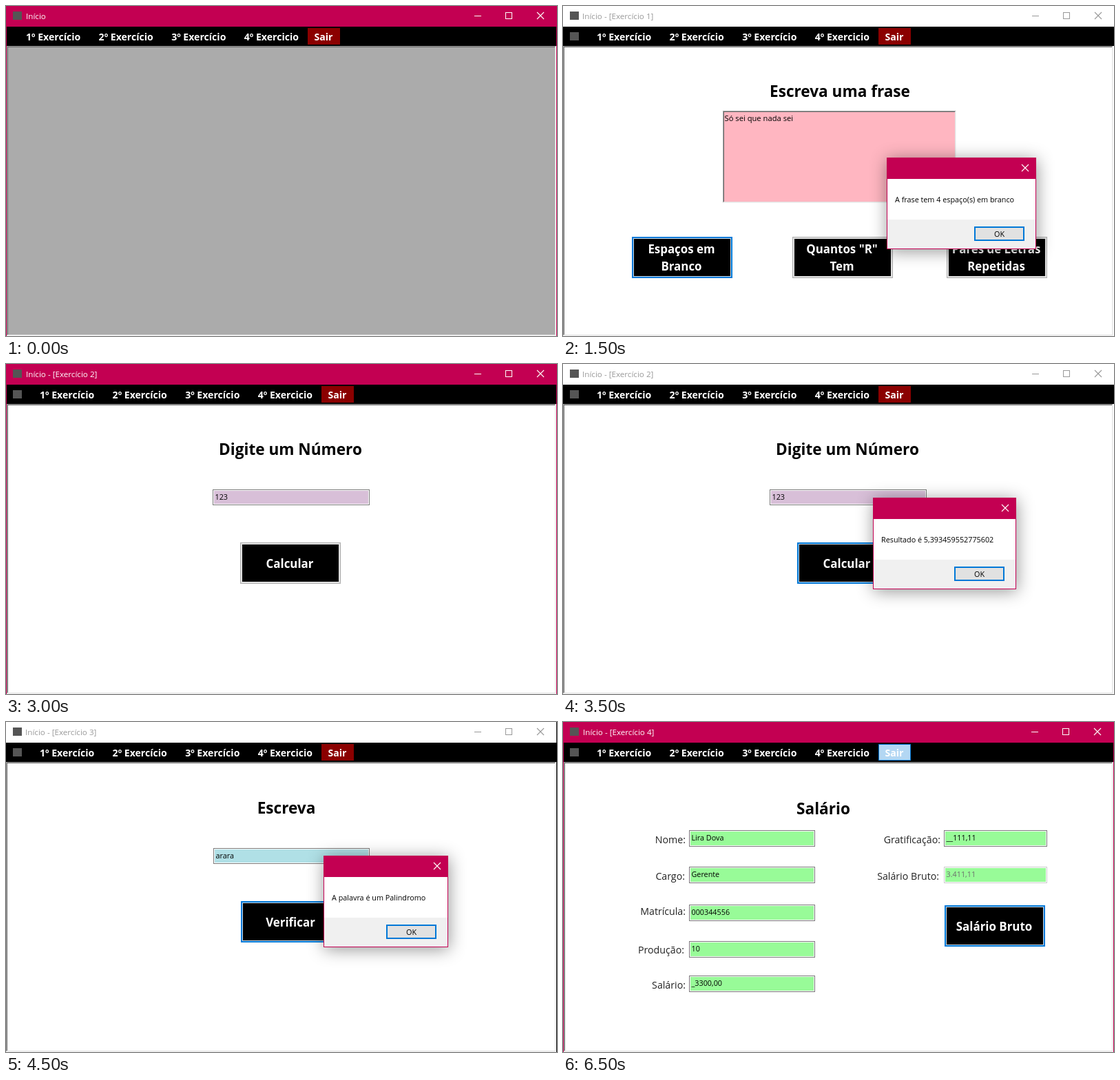
Recreate the animation shown at these times as an HTML page. Size 800x479 px, loop 7 s.

```html
<!DOCTYPE html>
<html lang="pt">
<head>
<meta charset="utf-8">
<style>
  html, body { margin: 0; width: 100%; height: 100%; overflow: hidden; background: #fff; }
  svg { display: block; width: 100vw; height: 100vh; font-family: "Open Sans", "Noto Sans", sans-serif; }
  text { white-space: pre; }
  rect { shape-rendering: crispEdges; }
  .dialog { filter: drop-shadow(1px 3px 12px rgba(0, 0, 0, .42)); }
</style>
</head>
<body>
<svg id="stage" viewBox="0 0 800 479"></svg>
<script>
const PINK = '#c30052', BLUE = '#0078d7', STEP_MS = 500;
const PHRASE = 'Só sei que nada sei', WORD = 'subinoonibus';

const steps = [
  { ex: 0 },
  { ex: 1, text: '', hover: 0 },
  { ex: 1, text: PHRASE },
  { ex: 1, text: PHRASE, focus: 0, dialog: [470, 220, 217, 'A frase tem 4 espaço(s) em branco'] },
  { ex: 1, text: WORD },
  { ex: 1, text: WORD, focus: 2, dialog: [485, 220, 188, 'A frase tem 1 pares de letras'] },
  { ex: 2, text: '123' },
  { ex: 2, text: '123', focus: 0, dialog: [450, 194, 208, 'Resultado é 5,393459552775602'] },
  { ex: 3, text: 'arara' },
  { ex: 3, text: 'arara', focus: 0, dialog: [461, 194, 181, 'A palavra é um Palindromo'] },
  { ex: 4 },
  { ex: 4, filled: true },
  { ex: 4, filled: true, gross: '3.411,11', focus: 0 },
  { ex: 4, filled: true, gross: '3.411,11', focus: 0, hover: 4 }
];

const rect = (x, y, w, h, fill) =>
  `<rect x="${x}" y="${y}" width="${w}" height="${h}" fill="${fill}"/>`;

const text = (x, y, size, str, { fill = '#000', bold = false, anchor = 'start' } = {}) =>
  `<text x="${x}" y="${y}" font-size="${size}" fill="${fill}" font-weight="${bold ? 700 : 400}" text-anchor="${anchor}">${str}</text>`;

const heading = (x, y, str) => text(x, y, 22.6, str, { bold: true, anchor: 'middle' });

// Nested rectangles, one pixel of border per colour.
const framed = (x, y, w, h, ...colours) =>
  colours.map((c, i) => rect(x + i, y + i, w - 2 * i, h - 2 * i, c)).join('');

const sunken = (x, y, w, h, fill) =>
  rect(x, y, w, h, '#f4f4f4') + rect(x, y, w - 1, h - 1, '#a0a0a0') +
  rect(x + 1, y + 1, w - 2, h - 2, '#e3e3e3') + rect(x + 1, y + 1, w - 3, h - 3, '#696969') +
  rect(x + 2, y + 2, w - 4, h - 4, fill);

const cross = (x, y, colour) =>
  `<path d="M${x - 5} ${y - 5}l10 10m0-10l-10 10" stroke="${colour}" stroke-width="1.1" fill="none"/>`;

const field = (x, y, w, h, fill, str, disabled = false) =>
  framed(x, y, w, h, disabled ? '#ccc' : '#7a7a7a', '#fff', fill) +
  text(x + 3.5, y + 15, 10.8, str, { fill: disabled ? '#6d6d6d' : '#000' });

function button(x, y, lines, focused) {
  const borders = focused ? [BLUE, BLUE, '#c8d8e6'] : ['#adadad', '#e1e1e1', '#e1e1e1'];
  const first = y + 36.5 - (lines.length - 1) * 12.5;
  return framed(x, y, 146, 60, ...borders, '#000') + lines.map((line, i) =>
    text(x + 72, first + i * 25, 16.9, line, { fill: '#fff', bold: true, anchor: 'middle' })).join('');
}

function titleBar({ ex, dialog }) {
  const ink = dialog ? '#999' : '#fff';
  const shift = dialog && ex < 3 ? 1 : 0;
  return rect(0, 0, 800, 30, dialog ? '#fff' : PINK) +
    rect(10, 8, 13, 12, '#555') +
    text(dialog ? 28 : 29, 19, 11.65, ex ? `Início - [Exercício ${ex}]` : 'Início', { fill: ink }) +
    rect(680 + shift, 14, 10, 1, ink) +
    `<rect x="${725.5 + shift}" y="9.5" width="9" height="9" fill="none" stroke="${ink}"/>` +
    cross(776 + shift, 14, ink);
}

function menuBar({ ex, hover }) {
  const left = ex ? 49 : 29;
  const names = ['1º Exercício', '2º Exercício', '3º Exercício', '4º Exercicio', 'Sair'];
  let out = rect(0, 30, 800, 28, '#000') + (ex ? rect(10, 38, 13, 12, '#555') : '');
  names.forEach((name, i) => {
    const last = i === 4;
    const x = last ? left + 418.5 : left + i * 105.6;
    const boxX = Math.round(x - 10), boxW = last ? 47 : 106;
    if (hover === i) out += framed(boxX, 32, boxW, 24, BLUE, '#b3d7f3');
    else if (last) out += rect(boxX, 32, boxW, 24, '#8b0000');
    out += text(x, 50, 14.1, name, { fill: '#fff', bold: true });
  });
  return out;
}

const forms = [
  () => '',

  ({ text: str, focus, dialog }) => {
    const [xs, y] = dialog ? [[100, 333, 557], 335] : [[101, 333, 556], 334];
    const labels = [['Espaços em', 'Branco'], ['Quantos "R"', 'Tem'], ['Pares de Letras', 'Repetidas']];
    return heading(402, 132, 'Escreva uma frase') +
      sunken(232, 152, 339, 134, '#ffb6c1') +
      text(234.5, 167, 11.2, str) +
      labels.map((lines, i) => button(xs[i], y, lines, focus === i)).join('');
  },

  ({ text: str, focus }) =>
    heading(413, 132, 'Digite um Número') +
    field(300, 182, 228, 23, '#d8bfd8', str) +
    button(340, 259, ['Calcular'], focus === 0),

  ({ text: str, focus }) =>
    rect(799, 0, 1, 479, '#000') +
    heading(407, 133, 'Escreva') +
    field(301, 183, 227, 23, '#b0e0e6', str) +
    button(341, 260, ['Verificar'], focus === 0),

  ({ filled, gross = '', focus }) => {
    const rows = [
      ['Nome:', 178, 176, 183, 157, 'Lira Dova'],
      ['Cargo:', 177, 229, 183, 210, 'Gerente'],
      ['Matrícula:', 178, 280, 183, 265, '000344556'],
      ['Produção:', 176, 336, 183, 318, '10'],
      ['Salário:', 178, 387, 183, 368, '_3300,00', '_____,__'],
      ['Gratificação:', 548, 176, 553, 157, '__111,11', '_____,__']
    ];
    const label = (x, y, str) => text(x, y, 14.2, str, { fill: '#222', anchor: 'end' });
    return heading(378, 134, 'Salário') +
      rows.map(([name, lx, ly, x, y, value, blank = '']) =>
        label(lx, ly, name) + field(x, y, x < 400 ? 183 : 150, 24, '#98fb98', filled ? value : blank)).join('') +
      label(546, 229, 'Salário Bruto:') + field(553, 210, 150, 24, '#98fb98', gross, true) +
      button(554, 266, ['Salário Bruto'], focus === 0);
  }
];

function messageBox([x, y, w, message]) {
  const right = x + w;
  return `<g class="dialog">${rect(x, y, w, 133, PINK)}</g>` +
    rect(x + 1, y + 31, w - 2, 59, '#fff') +
    rect(x + 1, y + 90, w - 2, 42, '#f0f0f0') +
    cross(right - 16, y + 15, '#fff') +
    text(x + 12, y + 65, 10.8, message) +
    framed(right - 90, y + 100, 73, 21, BLUE, BLUE, '#e1e1e1') +
    text(right - 53.5, y + 115, 10.8, 'OK', { anchor: 'middle' });
}

function scene(step) {
  const { ex, dialog } = step;
  const left = dialog ? 0 : 1;
  const edges = dialog ? '' : rect(0, 30, 1, 449, PINK) + rect(799, 30, 1, 449, PINK);
  return rect(0, 0, 800, 479, '#fff') + titleBar(step) + menuBar(step) +
    sunken(left, 58, 799 - left, 421, ex ? '#fff' : '#ababab') + edges +
    forms[ex](step) + (dialog ? messageBox(dialog) : '');
}

const stage = document.getElementById('stage');
let shown = -1;

function tick() {
  const index = Math.floor(performance.now() / STEP_MS) % steps.length;
  if (index !== shown) {
    stage.innerHTML = scene(steps[index]);
    shown = index;
  }
  requestAnimationFrame(tick);
}
tick();
</script>
</body>
</html>
```
